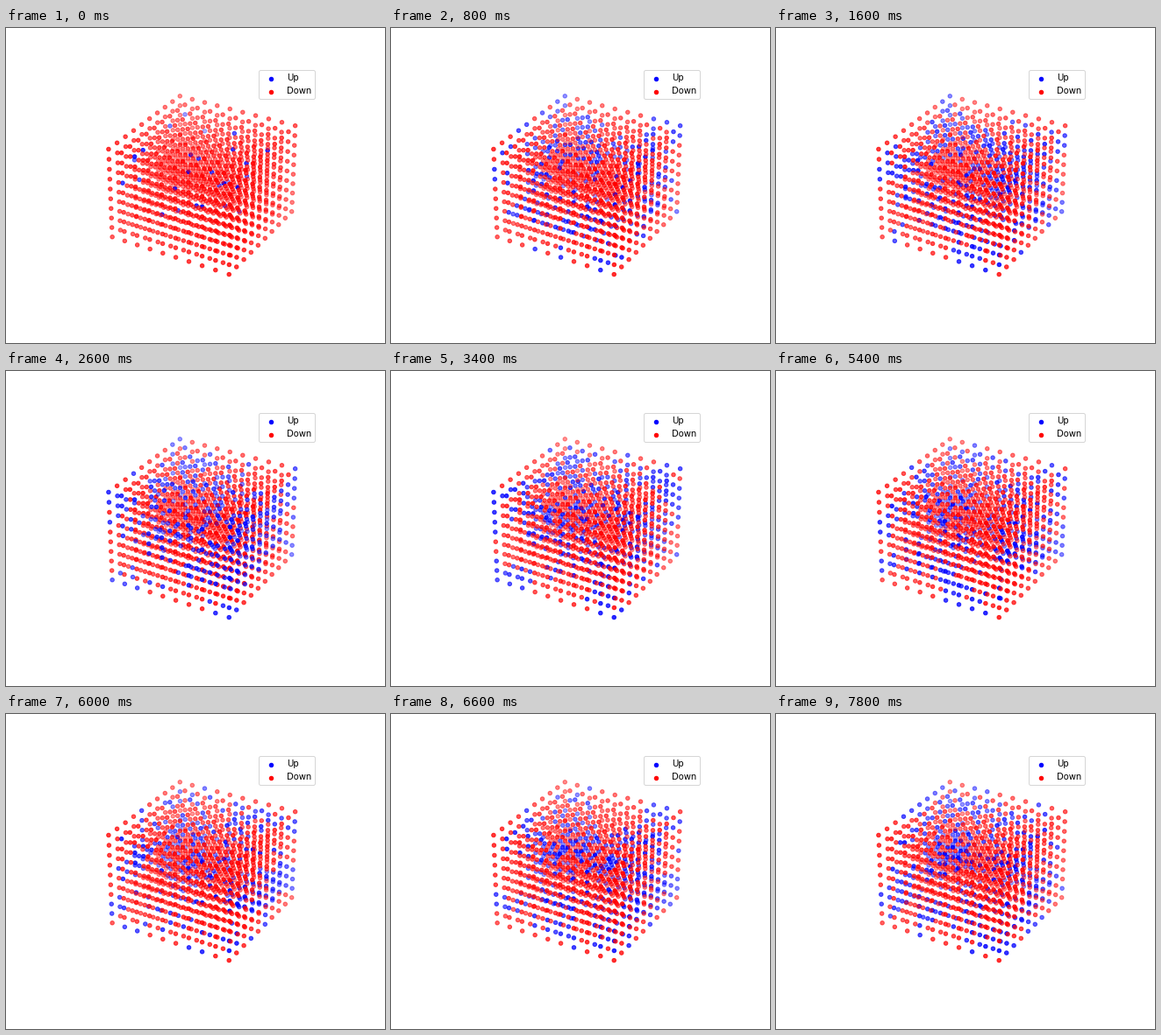
A matplotlib script for the animation above (8000 ms loop, 432x360 px).

```python
import numpy as np
import matplotlib.pyplot as plt
from matplotlib.animation import FuncAnimation

plt.rcParams["font.family"] = "DejaVu Sans"

SIZE = 10
SHAPE = (SIZE,) * 3
FRAMES = 40
INTERVAL = 200
SEED = 12

TEMPERATURE = 4.7
START_UP = 0.05   # chance of an up spin in the topmost layer at the start
MEAN_SPIN = -0.38  # level the lattice settles at
PULL = 3.0        # how firmly the field holds that level
RATE = 0.4        # share of the sites tried per frame

x, y, z = grid = np.indices(SHAPE)
checker = (x + y + z) % 2


def sweep(spins, rng):
    """One partial Metropolis pass, one checkerboard colour at a time."""
    for colour in (0, 1):
        near = sum(np.roll(spins, s, axis) for axis in range(3) for s in (-1, 1))
        field = PULL * (MEAN_SPIN - spins.mean())
        cost = 2 * spins * (near + field)
        accept = rng.random(SHAPE) < np.exp(-np.maximum(cost, 0) / TEMPERATURE)
        tried = rng.random(SHAPE) < RATE
        spins = np.where(accept & tried & (checker == colour), -spins, spins)
    return spins


def simulate():
    """Spin states of the whole loop, from nearly all down to mixed."""
    rng = np.random.default_rng(SEED)
    chance = START_UP * z / (SIZE - 1)
    states = [np.where(rng.random(SHAPE) < chance, 1, -1)]
    while len(states) < FRAMES:
        states.append(sweep(states[-1], rng))
    return states


states = simulate()

fig = plt.figure(figsize=(6, 5), dpi=72)
fig.subplots_adjust(bottom=0.125)
ax = fig.add_subplot(projection="3d")
ax.set_axis_off()

# Fix the limits to the whole lattice
lattice = ax.scatter(*grid.reshape(3, -1))
ax.autoscale_view()
ax.autoscale(False)
lattice.remove()

clouds = []


def draw(frame):
    while clouds:
        clouds.pop().remove()
    for spin, colour, label in ((1, "blue", "Up"), (-1, "red", "Down")):
        sites = np.nonzero(states[frame] == spin)
        clouds.append(ax.scatter(*sites, c=colour, label=label))
    return clouds


draw(0)
ax.legend(loc="upper right")

anim = FuncAnimation(fig, draw, frames=FRAMES, interval=INTERVAL,
                     init_func=lambda: draw(0), repeat=True, repeat_delay=0)
plt.show()
```
